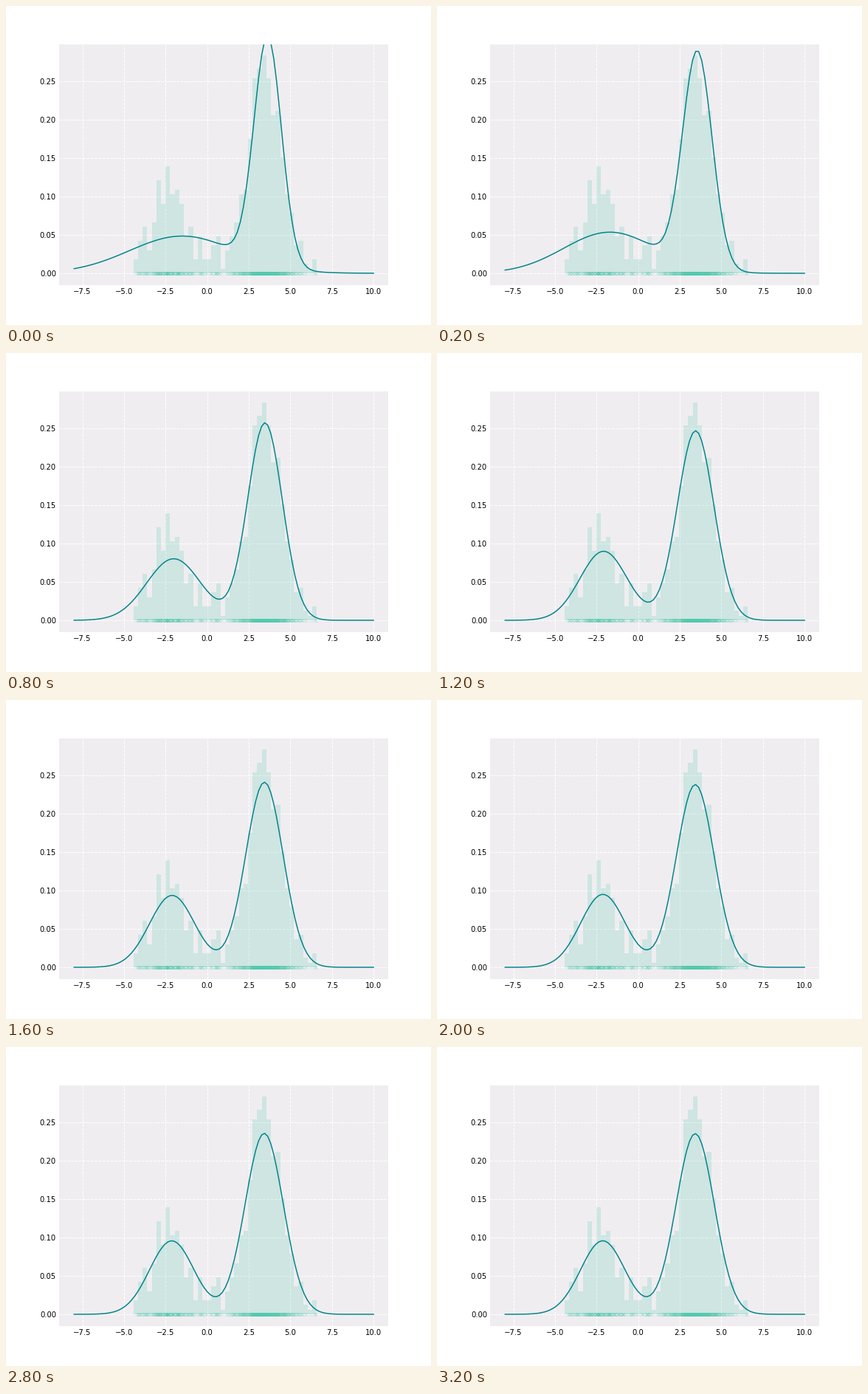
Recreate the animation shown at these times as a matplotlib script. Size 576x432 px, loop 3.4 s.

```python
import numpy as np
import matplotlib.pyplot as plt
from matplotlib.animation import FuncAnimation

FRAMES, INTERVAL = 17, 200
MINT, TEAL, PAPER = "#4bc9ac", "#00848a", "#efedf0"

COUNTS = [3, 7, 10, 5, 11, 20, 15, 23, 17, 18, 15, 8, 10, 3, 8, 3, 3, 6, 8, 1,
          5, 8, 11, 17, 18, 29, 42, 44, 47, 42, 34, 35, 25, 17, 13, 6, 7, 2, 1, 3]
edges = np.linspace(-4.431, 6.589, len(COUNTS) + 1)
bin_width = edges[1] - edges[0]
density = np.array(COUNTS) / (sum(COUNTS) * bin_width)

rng = np.random.default_rng(4)
samples = np.repeat(edges[:-1], COUNTS) + rng.uniform(0, bin_width, sum(COUNTS))

# Mixture while it settles: step, left weight, left mean, right mean, left and right sigma
SETTLING = np.array([
    [0, 0.387, -1.50, 3.64, 3.18, 0.825],
    [2, 0.352, -1.85, 3.52, 2.25, 0.95],
    [4, 0.326, -2.01, 3.48, 1.61, 1.04],
    [6, 0.321, -2.08, 3.45, 1.43, 1.10],
    [8, 0.320, -2.11, 3.44, 1.37, 1.128],
    [12, 0.3195, -2.125, 3.43, 1.334, 1.145],
    [16, 0.3195, -2.13, 3.43, 1.32, 1.15],
])


def decay(step):
    return 0.7 ** step


# Every parameter relaxes as a cubic in the decaying exponential
relaxation = np.polyfit(decay(SETTLING[:, 0]), SETTLING[:, 1:], 3)


def gaussian(x, mean, sigma):
    return np.exp(-((x - mean) / sigma)**2 / 2) / (sigma * np.sqrt(2 * np.pi))


def mixture(x, step):
    weight, left, right, left_sigma, right_sigma = decay(step) ** np.arange(3, -1, -1) @ relaxation
    return weight * gaussian(x, left, left_sigma) + (1 - weight) * gaussian(x, right, right_sigma)


plt.rcParams.update({"font.family": "DejaVu Sans", "font.size": 10})
fig = plt.figure(figsize=(8, 6), dpi=72, facecolor="white")
ax = fig.add_axes([0.125, 0.125, 0.775, 0.755], facecolor=PAPER)
ax.set_axisbelow(True)
ax.grid(color="white", linestyle="--", linewidth=1)
ax.tick_params(length=0, pad=4)
for spine in ax.spines.values():
    spine.set_visible(False)

ax.bar(edges[:-1], density, bin_width, align="edge", color=MINT, alpha=0.2, linewidth=0)
ax.scatter(samples, np.zeros_like(samples), s=20, marker="x", linewidth=1,
           color=MINT, alpha=0.15)
grid_x = np.linspace(-8, 10, 100)
curve, = ax.plot([], [], color=TEAL, linewidth=1.5)
ax.set_xlim(-8.9, 10.9)
ax.set_ylim(-0.01545, 0.29858)


def update(frame):
    curve.set_data(grid_x, mixture(grid_x, frame))
    return curve,


anim = FuncAnimation(fig, update, frames=FRAMES, interval=INTERVAL, repeat=True)
plt.show()
```
